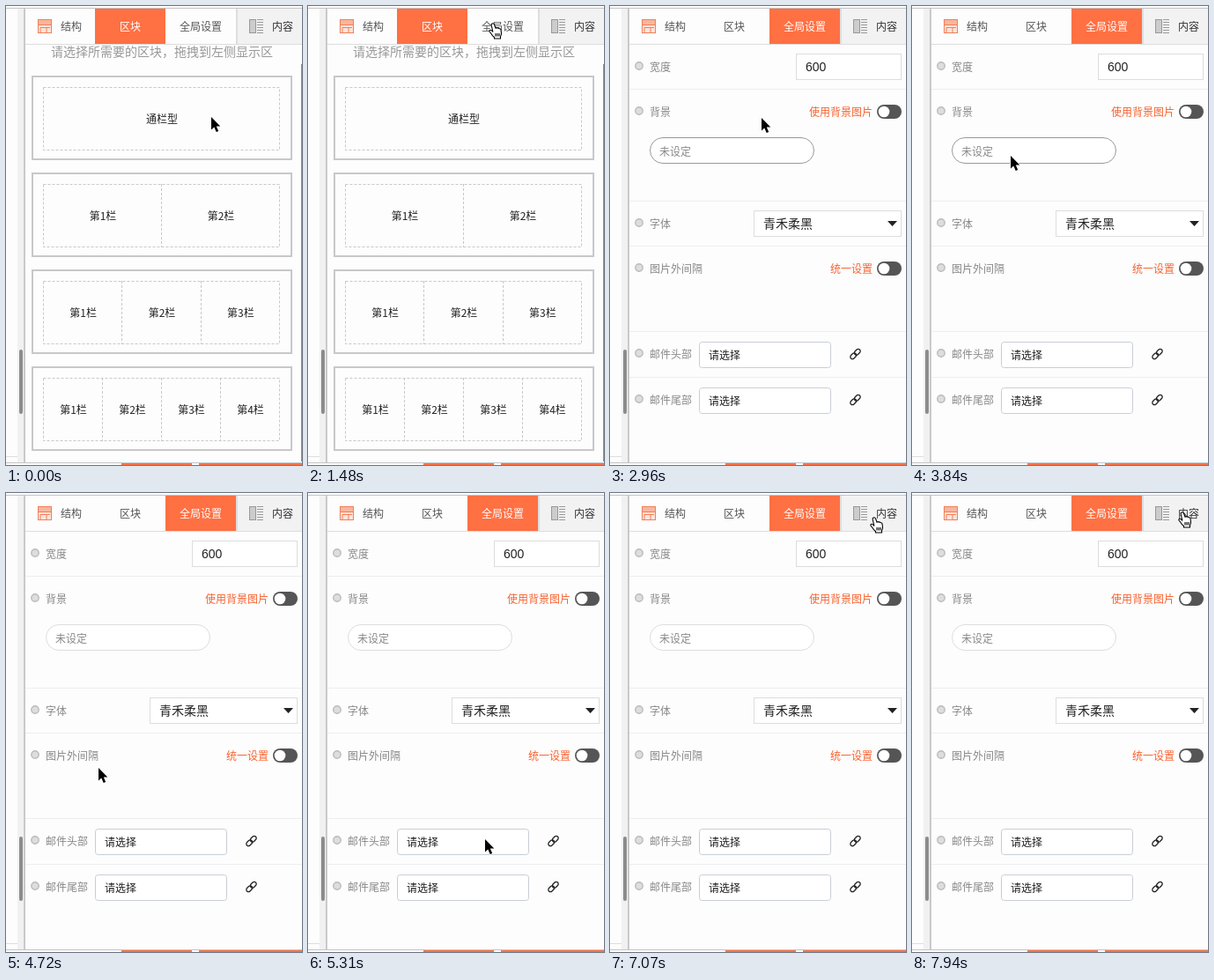
An HTML page that plays this animation: 336x521 px, repeating every 8000 ms.

```html
<!DOCTYPE html>
<html lang="zh-CN">
<head>
<meta charset="utf-8">
<style>
html, body { margin: 0; width: 100%; height: 100%; overflow: hidden; background: #fdfdfd; }
svg { display: block; font: 12px 'Noto Sans CJK SC', 'Noto Sans CJK', sans-serif; }
</style>
</head>
<body>
<svg id="stage" width="336" height="521" viewBox="0 0 336 521"></svg>
<script>
const ORANGE = '#ff7043', GRAY = '#888', DARK = '#222';

const rect = (x, y, w, h, fill, more = '') =>
  `<rect x="${x}" y="${y}" width="${w}" height="${h}" fill="${fill}" ${more}/>`;
const frame = (x, y, w, h, stroke, more = '') =>
  rect(x + .5, y + .5, w - 1, h - 1, 'none', `stroke="${stroke}" ${more}`);
// y is the vertical middle of the glyphs
const text = (x, y, str, fill = DARK, size = 12, more = '') =>
  `<text x="${x}" y="${y + size * .38}" fill="${fill}" font-size="${size}" ${more}>${str}</text>`;
const path = (d, stroke, more = 'fill="none"') => `<path d="${d}" stroke="${stroke}" ${more}/>`;

const shell = () =>
  rect(0, 0, 336, 521, '#fdfdfd') +
  rect(13, 3, 7, 515, '#f1f1f1') + rect(0, 511, 13, 1, '#ddd') +
  rect(15, 390, 4, 73, '#8c8c8c', 'rx="2"') +
  rect(20, 2, 2, 516, '#c9c9c9') +
  rect(22, 43, 314, 1, '#ddd') +
  rect(0, 2, 336, 1, '#c4c4c4') + rect(0, 518, 336, 1, '#c4c4c4') +
  rect(131, 519, 80, 2, ORANGE) + rect(219, 519, 117, 2, ORANGE);

const tabs = active => {
  const tab = (x, tx, str, i) =>
    (i === active ? rect(x, 3, 80, 40, ORANGE) : '') +
    text(tx, 23, str, i === active ? '#fff' : '#555');
  return rect(262, 3, 74, 40, '#f2f2f2') + rect(261, 3, 2, 40, '#dedede') +
    rect(36.5, 15.5, 15, 15, '#fde3d9', 'stroke="#f0805a"') +
    rect(37, 16, 14, 5, '#f9b59d') +
    path('M36 21.5H52M39 24.5H46V30M46 24.5H50M39 24.5V30', '#f0805a') +
    rect(276.5, 15.5, 7, 15, '#ccc', 'stroke="#999"') +
    path('M285 15.5H292M285 18.5H292M285 21.5H292M285 24.5H292M285 27.5H292M285 30.5H292', '#999') +
    tab(21, 62, '结构', 0) + tab(101, 129, '区块', 1) + tab(181, 197, '全局设置', 2) +
    text(302, 23, '内容', '#333');
};

const blocks = () => {
  let out = text(51, 52, '请选择所需要的区块，拖拽到左侧显示区', '#999', 14) +
    rect(335, 66, 1, 451, '#888');
  const dash = 'stroke-dasharray="3 2"';
  for (let n = 1; n <= 4; n++) {
    const y = 79 + 110 * (n - 1), w = 268 / n;
    out += rect(30, y + 1, 294, 94, 'none', 'stroke="#c8c8c8" stroke-width="2"') +
      frame(42, y + 13, 269, 72, '#c8c8c8', dash);
    for (let i = 0; i < n; i++) {
      const x = 42 + w * i;
      if (i) out += path(`M${Math.round(x) + .5} ${y + 13}v72`, '#c8c8c8', dash);
      out += text(x + w / 2 + 1, y + 49, n > 1 ? `第${i + 1}栏` : '通栏型', DARK, 12, 'text-anchor="middle"');
    }
  }
  return out;
};

const toggle = y => rect(303, y, 28, 16, '#555', 'rx="8"') +
  `<circle cx="311" cy="${y + 8}" r="6.3" fill="#fff"/>`;

const chain = y => `<g transform="translate(278.5 ${y}) rotate(-45)" fill="none" stroke="#222" stroke-width="1.3">
  <rect x="-7" y="-2.4" width="7.6" height="4.8" rx="2.4"/>
  <rect x="-.6" y="-2.4" width="7.6" height="4.8" rx="2.4"/></g>`;

const mailRow = (y, str) => text(45, y, str, GRAY) +
  rect(101.5, y - 13.5, 149, 29, '#fff', 'rx="3" stroke="#c9cdd6"') +
  text(112, y + 1, '请选择') + chain(y);

const settings = () => {
  const bullets = [68, 119, 246, 297, 394, 446].map(y =>
    `<circle cx="33" cy="${y}" r="4.2" fill="#ddd" stroke="#bbb" stroke-width="1.4"/>`).join('');
  const lines = [94, 221, 272, 369, 421].map(y => rect(22, y, 314, 1, '#eee')).join('');
  return lines + bullets +
    text(45, 69, '宽度', GRAY) + rect(211.5, 54.5, 119, 29, '#fff', 'stroke="#ddd"') +
    `<text x="222" y="74" fill="#222" font-size="14" font-family="Liberation Sans, sans-serif">600</text>` +
    text(45, 120, '背景', GRAY) + text(226, 120, '使用背景图片', '#f7622f') + toggle(112) +
    rect(45.5, 149.5, 186, 29, '#fff', 'id="pill" rx="14.5"') +
    text(56, 165, '未设定', GRAY, 12, 'font-weight="500"') +
    text(45, 247, '字体', GRAY) + rect(163.5, 232.5, 167, 29, '#fff', 'stroke="#ddd"') +
    text(174, 247, '青禾柔黑', DARK, 14) + path('M315 244h11l-5.5 6z', 'none', 'fill="#222"') +
    text(45, 298, '图片外间隔', GRAY) + text(250, 298, '统一设置', '#f7622f') + toggle(290) +
    mailRow(395, '邮件头部') + mailRow(447, '邮件尾部');
};

const arrow = path('M0 0V14.5L3.3 11.4L5.7 17L8.2 16L5.8 10.6H10.3Z', '#fff', 'fill="#000" paint-order="stroke" stroke-width="1.6"');
const hand = `<g transform="translate(-5 -1)" stroke-width="1.1" stroke-linejoin="round">` +
  path('M4 1Q5.5 .2 6.5 2L8 6.2Q9 5 10 6.2Q11 5.3 12 6.8Q13.6 6.3 14 8L14.5 12Q14.5 14 13.5 15.5V18H6.5V16.5Q4 14.5 3 12.5L1 10Q.5 8.4 2 8.3Q3.3 8.5 4.8 10.2L3.2 3Q2.8 1.6 4 1Z', '#000', 'fill="#fff"') +
  path('M8 12V15.5M10 12V15.5M12 12V15.5', '#000') + '</g>';

const stage = document.getElementById('stage');
stage.innerHTML = shell() +
  `<g id="one">${blocks()}${tabs(1)}</g><g id="two">${settings()}${tabs(2)}</g>` +
  `<g id="pointer"><g id="arrow">${arrow}</g><g id="hand">${hand}</g></g>`;
const el = id => document.getElementById(id);

// Pointer waypoints: tick, x, y
const LOOP = 8000, TICK = 147.2;
const WAY = [
  [0, 233, 126], [1, 234, 110], [3, 232, 50], [4, 231, 28], [5, 230, 20], [9, 230, 20],
  [10, 210, 20], [11, 212, 22], [15, 212, 22], [16, 210, 30], [18, 192, 88], [20, 172, 127],
  [21, 166, 124], [23, 140, 96], [24, 128, 100], [26, 112, 170], [29, 96, 270], [31, 95, 292],
  [32, 105, 312], [35, 165, 370], [38, 272, 440], [39, 283, 454], [40, 284, 461], [41, 284, 461],
  [42, 281, 456], [43, 281, 430], [47, 294, 75], [48, 300, 28], [49, 301, 1], [50, 303, 6], [54, 307, 22]
];

const pointerAt = tick => {
  const i = WAY.findIndex(p => p[0] >= tick);
  if (i < 0) return WAY[WAY.length - 1].slice(1);
  if (!i) return WAY[0].slice(1);
  const a = WAY[i - 1], b = WAY[i], k = (tick - a[0]) / (b[0] - a[0]);
  return [1, 2].map(j => Math.round(a[j] + (b[j] - a[j]) * k));
};

const show = (id, on) => el(id).setAttribute('display', on ? 'inline' : 'none');

function draw(now) {
  const tick = Math.floor((now % LOOP + 10) / TICK);
  const [x, y] = pointerAt(tick);
  const onLink = y > 3 && y < 43 || y > 438;
  show('one', tick < 11);
  show('two', tick >= 11);
  show('hand', onLink);
  show('arrow', !onLink);
  el('pill').setAttribute('stroke', y > 94 && y < 221 ? '#999' : '#ddd');
  el('pointer').setAttribute('transform', `translate(${x} ${y})`);
}

const start = performance.now();
function loop() {
  draw(performance.now() - start);
  requestAnimationFrame(loop);
}
loop();
</script>
</body>
</html>
```
